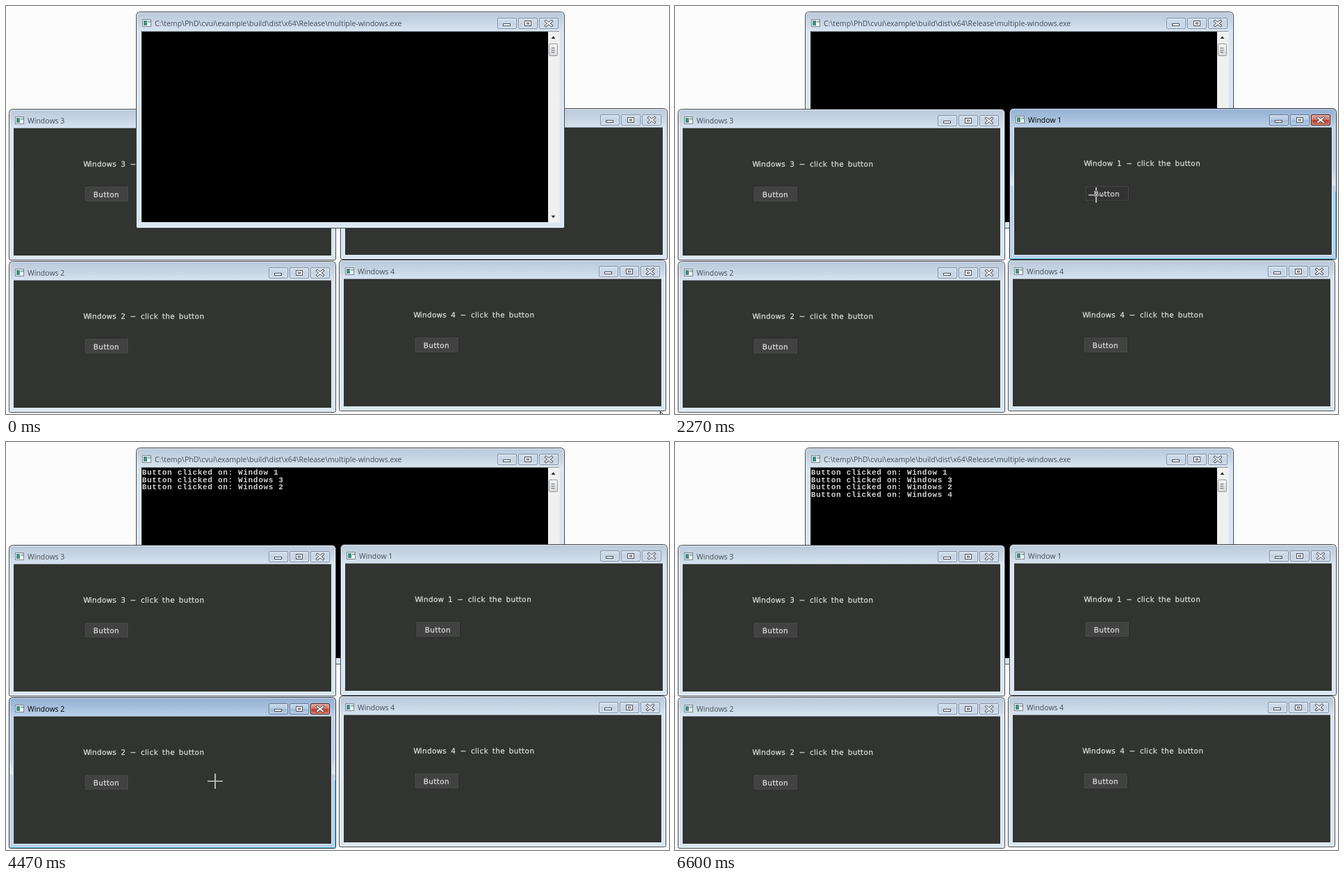
Write an HTML page that moves like this. It is 954 px wide and 587 px high and loops after 6.79 s.

```html
<!DOCTYPE html>
<html lang="en">
<head>
<meta charset="utf-8">
<title>Multiple windows</title>
<style>
html, body { margin: 0; width: 100%; height: 100%; overflow: hidden; background: #fcfcfc; }
#stage { position: relative; width: 954px; height: 587px; overflow: hidden; background: #fcfcfc; isolation: isolate; }
#stage > svg { position: absolute; display: block; }
.frame { fill: url(#idle); stroke: #3d444c; }
.gleam { fill: none; stroke: #fff; stroke-opacity: .6; }
.glow { fill: none; stroke: #4fcdf2; stroke-opacity: .8; display: none; }
.title { font: 10.5px "Open Sans", "Noto Sans", sans-serif; fill: #454d57; }
.cap { fill: url(#capIdle); stroke: #8291a5; }
.capIn { fill: none; stroke: #fff; stroke-opacity: .35; }
.glyph { fill: #fff; stroke: #4b5361; }
.on .frame { fill: url(#live); stroke: #1d2733; }
.on .glow { display: inline; }
.on .title { fill: #000; }
.on .cap { fill: url(#capLive); stroke: #5f7894; }
.on .cap.close { fill: url(#red); stroke: #571c17; }
.cv { font: 10.4px "DejaVu Sans", sans-serif; fill: #dcdcdc; stroke: #dcdcdc; stroke-width: .25; text-anchor: middle; text-rendering: geometricPrecision; }
.btn { fill: #424242; stroke: #2c2c2c; }
.over .btn { fill: #505050; }
.down .btn { fill: #323232; }
.log { font: bold 11px "Liberation Mono", "DejaVu Sans Mono", monospace; letter-spacing: .68px; fill: #d4d4d4; }
#cross { mix-blend-mode: difference; }
#cross, #arrow { left: 0; top: 0; z-index: 9; overflow: visible; }
</style>
</head>
<body>
<div id="stage"></div>
<script>
const LOOP = 6790, STEP = 200 / 3;
const W = 471, H = 218;
const stage = document.getElementById('stage');

const wins = [
  { id: 1, name: 'Window 1', x: 481, y: 147, down: 2270, up: 2400 },
  { id: 3, name: 'Windows 3', x: 4, y: 148, down: 3200, up: 3330 },
  { id: 2, name: 'Windows 2', x: 4, y: 367, down: 3930, up: 4070 },
  { id: 4, name: 'Windows 4', x: 479, y: 365, down: 5130, up: 5330 }
];
const con = { x: 187, y: 8, w: 617, h: 312 };

// Which window has focus from each time on
const focus = [[0, 0], [800, 3], [1470, 1], [3200, 3], [3930, 2], [5130, 4], [6600, 0]];

// Pointer moves: start, end, control point, end point
const home = [941, 583];
const moves = [
  [0, 670, 300, 137, 106, 209],
  [800, 1470, 490, 215, 869, 246],
  [1600, 2000, 740, 252, 606, 272],
  [2400, 2930, 380, 272, 146, 285],
  [2930, 3070, 152, 279, 157, 271],
  [3330, 3870, 150, 380, 150, 490],
  [4110, 5060, 385, 487, 620, 488],
  [5330, 5730, 400, 480, 177, 485],
  [5730, 6000, 110, 500, 94, 547],
  [6000, 6330, 90, 570, 83, 602]
];

// Advance widths of the stroke lettering, in its own units
const wide = { W: 24, B: 21, i: 8, l: 8, w: 22, s: 17, c: 18, k: 17, e: 18, t: 12, ' ': 16, '−': 26 };
const advance = ch => (wide[ch] || (/\d/.test(ch) ? 20 : 19)) * .367;

function lettering(str, x, y) {
  const xs = [...str].map(ch => {
    const a = advance(ch), mid = x + a / 2;
    x += a;
    return mid.toFixed(2);
  });
  return `<text class="cv" x="${xs.join(' ')}" y="${y}">${str}</text>`;
}

const rect = (x, y, w, h, extra) => `<rect x="${x}" y="${y}" width="${w}" height="${h}" ${extra}/>`;

const outline = (d, w, h, r) =>
  `M${d} ${h - d - 2}V${d + r}Q${d} ${d} ${d + r} ${d}H${w - d - r}Q${w - d} ${d} ${w - d} ${d + r}` +
  `V${h - d - 2}Q${w - d} ${h - d} ${w - d - 2} ${h - d}H${d + 2}Q${d} ${h - d} ${d} ${h - d - 2}Z`;

function caption(w) {
  const cross = 'M-4 -3.2L4 3.2M4 -3.2L-4 3.2';
  const box = [0, 1, 2].map(i => {
    const x = w - 96.5 + i * 30;
    return rect(x, 9.5, 27, 15, `rx="1.5" class="cap ${i === 2 ? 'close' : ''}"`) +
      rect(x + 1, 10.5, 25, 13, 'rx="1" class="capIn"');
  }).join('');
  return box +
    rect(w - 88.5, 17.5, 10, 3, 'class="glyph"') +
    rect(w - 57.5, 13.5, 9, 7, 'class="glyph"') +
    rect(w - 54.5, 16, 3, 2, 'class="glyph"') +
    `<g transform="translate(${w - 23} 17)" fill="none" stroke-linecap="square">
      <path d="${cross}" stroke="#4b5361" stroke-width="3.6"/><path d="${cross}" stroke="#fff" stroke-width="1.8"/></g>`;
}

function chrome(w, h, title) {
  return `<path class="frame" d="${outline(.5, w, h, 6)}"/>
    <path class="gleam" d="${outline(1.5, w, h, 5)}"/>
    <path class="glow" d="M2 ${h - 1.5}H${w - 1.5}V${h * .55}"/>
    ${rect(9.5, 11.5, 12, 10, 'fill="#f8fafa" stroke="#7b858c"')}
    ${rect(11, 13, 5, 7, 'fill="#3f8f86"')}
    ${rect(17, 13, 1.5, 3, 'fill="#8fa6a8"')}
    ${rect(19.5, 13, 1, 3, 'fill="#5a6468"')}
    <text class="title" x="27" y="21">${title}</text>${caption(w)}`;
}

function consoleBody() {
  const lines = wins.map((v, i) =>
    `<text class="log" x="8.7" y="${38.6 + i * 10.9}">Button clicked on: ${v.name}</text>`).join('');
  const grip = [0, 3, 6].map(d => rect(597.5, 52 + d, 5, 1, 'fill="#5c646c"')).join('');
  return rect(7.5, 28.5, 602, 275, 'fill="#f4eef0" stroke="#e9eef5"') +
    rect(7, 28, 602, 1, 'fill="#8c959f"') +
    rect(8, 29, 585, 274, 'fill="#000"') +
    rect(593, 29, 16, 274, 'fill="#f0f0f0"') +
    rect(594.5, 46.5, 12, 17, 'rx="1.5" fill="url(#thumb)" stroke="#979797"') + grip +
    `<path d="M597.5 39L600.5 35.5L603.5 39ZM597.5 293.5L600.5 297L603.5 293.5Z" fill="#222"/>` + lines;
}

function clientArea(v) {
  const ghost = v.id !== 1 ? '' :
    `<svg class="ghost" x="7" y="28" width="457" height="183">
      <use href="#console" x="${con.x - v.x - 7}" y="${con.y - v.y - 28}"/></svg>`;
  return rect(6.5, 27.5, 458, 184, 'fill="#313431" stroke="#e4edf6"') +
    rect(7, 27, 457, 1, 'fill="#a3aebb"') +
    rect(7, 28, 457, 183, 'fill="#313431"') +
    lettering(v.name + ' − click the button', 108, 83) +
    rect(109, 111.3, 63.5, 22.5, 'class="btn"') +
    rect(110, 112.3, 61.5, 20.5, 'fill="none" stroke="#494949"') +
    lettering('Button', 121.4, 126.5) + ghost;
}

function addSvg(x, y, w, h, inner, id = '') {
  stage.insertAdjacentHTML('beforeend',
    `<svg ${id && `id="${id}"`} width="${w}" height="${h}" style="left:${x}px;top:${y}px">${inner}</svg>`);
  return stage.lastElementChild;
}

const ramp = (id, h, stops) =>
  `<linearGradient id="${id}" ${h ? `gradientUnits="userSpaceOnUse" x1="0" y1="0" x2="0" y2="${h}"` : 'x1="0" y1="0" x2="0" y2="1"'}>` +
  stops.map(([o, c]) => `<stop offset="${o}" stop-color="${c}"/>`).join('') + '</linearGradient>';

addSvg(0, 0, 0, 0, '<defs>' +
  ramp('idle', H, [[0, '#bac9da'], [.06, '#c5d3e2'], [.13, '#d8e4f1'], [1, '#d9e6f4']]) +
  ramp('live', H, [[0, '#93b0d2'], [.06, '#a3bddb'], [.13, '#bdd2ea'], [.4, '#b7cfe9'], [.5, '#dbe8f6'], [.52, '#b9d1ea'], [1, '#b9d1ea']]) +
  ramp('capIdle', 0, [[0, '#d3dfec'], [.5, '#c6d4e4'], [1, '#cfdcea']]) +
  ramp('capLive', 0, [[0, '#c9d9ec'], [.48, '#b4c9e1'], [.5, '#9db7d5'], [1, '#b5cde6']]) +
  ramp('red', 0, [[0, '#e3a99c'], [.48, '#d2705f'], [.5, '#bd3a27'], [1, '#d5705a']]) +
  ramp('thumb', 0, [[0, '#f6f6f6'], [1, '#d6d8da']]) + '</defs>');

const conEl = addSvg(con.x, con.y, con.w, con.h,
  `<g id="console">${chrome(con.w, con.h, String.raw`C:\temp\PhD\cvui\example\build\dist\x64\Release\multiple-windows.exe`)}${consoleBody()}</g>`);
conEl.style.zIndex = 1;
const logs = conEl.querySelectorAll('.log');

for (const v of wins) v.el = addSvg(v.x, v.y, W, H, chrome(W, H, v.name) + clientArea(v));
const ghost = stage.querySelector('.ghost');

const cross = addSvg(0, 0, 24, 24,
  '<path d="M-11 0H11M0 -11V11" stroke="#fff" stroke-width="1.7"/>', 'cross');
const arrow = addSvg(0, 0, 14, 20,
  '<path d="M.5 .5V14.5L3.8 11.5L6 16.5L8 15.6L5.9 10.8H10.2Z" fill="#fff" stroke="#000"/>', 'arrow');

function pointer(t) {
  let [x, y] = home;
  for (const [a, b, cx, cy, ex, ey] of moves) {
    if (t < a) break;
    const p = Math.min(1, (t - a) / (b - a)), u = p * p * (3 - 2 * p), q = 1 - u;
    x = q * q * x + 2 * q * u * cx + u * u * ex;
    y = q * q * y + 2 * q * u * cy + u * u * ey;
  }
  return [x, y];
}

const inside = (x, y, l, t, w, h) => x >= l && x < l + w && y >= t && y < t + h;

function draw(t) {
  const active = focus.filter(f => f[0] <= t).pop()[1];
  const [x, y] = pointer(t);
  const onConsole = inside(x, y, con.x, con.y, con.w, con.h);
  let aim = false;
  wins.forEach((v, i) => {
    const raised = v.id % 2 === 0 || t >= (v.id === 3 ? 800 : 1470);
    const free = raised || !onConsole;
    if (free && inside(x, y, v.x + 7, v.y + 28, 457, 183)) aim = true;
    v.el.style.zIndex = raised ? 2 : 0;
    v.el.classList.toggle('on', active === v.id);
    v.el.classList.toggle('over', free && inside(x, y, v.x + 109, v.y + 111, 64, 23));
    v.el.classList.toggle('down', t >= v.down && t < v.up);
    logs[i].style.display = t >= v.up ? '' : 'none';
  });
  ghost.style.display = t >= 1470 && t < 1530 ? '' : 'none';
  const at = `translate(${Math.round(x)}px, ${Math.round(y)}px)`;
  cross.style.transform = arrow.style.transform = at;
  cross.style.display = aim ? 'block' : 'none';
  arrow.style.display = aim ? 'none' : 'block';
}

// The picture holds for a fifteenth of a second at a time
const start = performance.now();
function tick() {
  const ms = (performance.now() - start) % LOOP;
  draw(Math.round(Math.floor((ms + 5) / STEP) * STEP / 10) * 10);
  requestAnimationFrame(tick);
}
tick();
</script>
</body>
</html>
```
